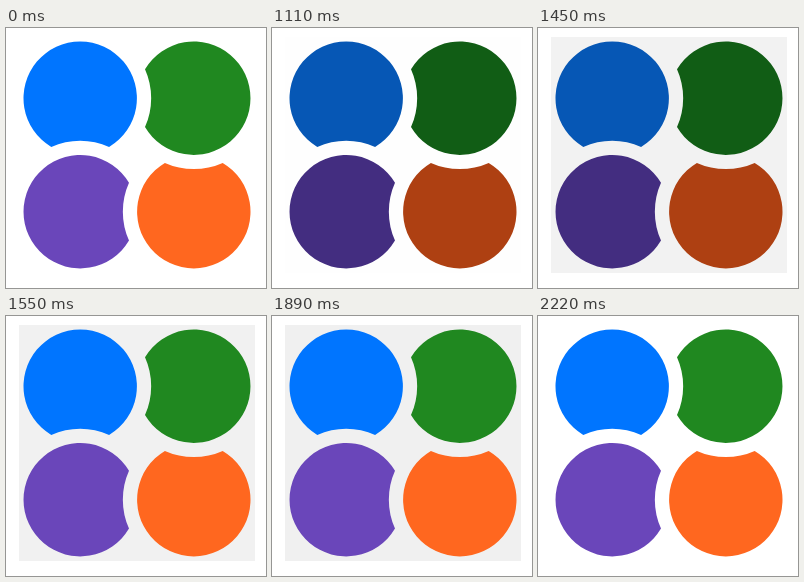
These frames come from a looping animation (260x260 px, 3.22 s). An HTML page:

```html
<!DOCTYPE html>
<html>
<head>
<meta charset="utf-8">
<style>
  html, body { margin: 0; width: 100%; height: 100%; overflow: hidden; background: #fff; }
  svg { display: block; width: 100%; height: 100%; }
</style>
</head>
<body>
<svg viewBox="0 0 260 260">
  <defs>
    <!-- disc with a bite taken out of its lower edge -->
    <path id="disc" d="M-28.9 48.8A56.7 56.7 0 1 1 28.9 48.8A70.9 70.9 0 0 0 -28.9 48.8Z"/>
  </defs>
  <rect id="panel" x="13" y="9" width="236" height="236" fill="#fff"/>
  <use href="#disc" transform="translate(74.2 70.2)"/>
  <use href="#disc" transform="translate(187.8 70.2) rotate(90)"/>
  <use href="#disc" transform="translate(187.8 183.7) rotate(180)"/>
  <use href="#disc" transform="translate(74.2 183.7) rotate(270)"/>
</svg>
<script>
  const LOOP = 3220;
  const BRIGHT = ['#0075ff', '#208820', '#ff671f', '#6a46ba'];
  const DARK = ['#0657b5', '#115d15', '#ae4012', '#432d80'];
  // [start time, grey level] of the panel as it fades in and out
  const GREYS = [
    [0, 255], [1110, 254], [1220, 251], [1330, 246], [1450, 242],
    [1550, 241], [1670, 240], [2110, 247], [2220, 255]
  ];

  const panel = document.getElementById('panel');
  const discs = document.querySelectorAll('use');

  function draw(t) {
    const colors = t >= 1000 && t < 1550 ? DARK : BRIGHT;
    discs.forEach((disc, i) => disc.setAttribute('fill', colors[i]));
    const grey = GREYS.filter(([start]) => start <= t).pop()[1];
    panel.setAttribute('fill', `rgb(${grey},${grey},${grey})`);
  }

  function tick() {
    draw(performance.now() % LOOP);
    requestAnimationFrame(tick);
  }
  tick();
</script>
</body>
</html>
```
